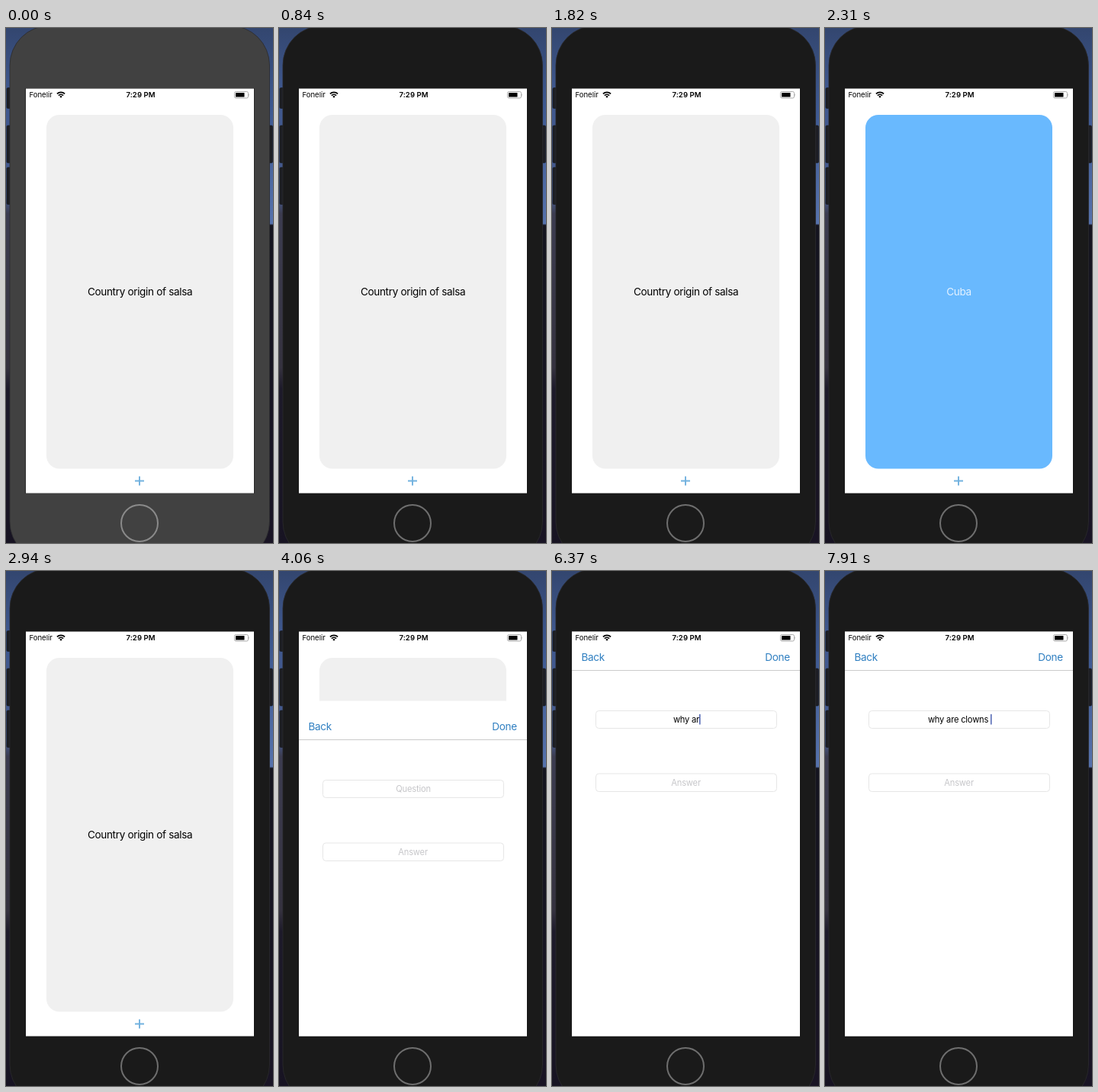
Recreate the animation shown at these times as an HTML page. Size 350 by 676 pixels, loop 8000 ms.

```html
<!DOCTYPE html>
<html lang="en">
<head>
<meta charset="utf-8">
<title>Flash cards</title>
<style>
  html, body { margin: 0; width: 100%; height: 100%; overflow: hidden; background: #15131f; }
  svg { display: block; width: 100%; height: 100%; }
  text { font: 13.55px Inter, "Liberation Sans", sans-serif; letter-spacing: -.33px; }
  .mid { text-anchor: middle; }
  .link { fill: #2f7fc1; }
  .input { font-size: 11.16px; letter-spacing: -.2px; }
  .hint { fill: #c6c6c9; }
  .status { font-size: 9.56px; letter-spacing: 0; }
  .time { font-weight: 600; letter-spacing: .1px; }
  .field { fill: #fff; stroke: #e6e6e6; }
</style>
</head>
<body>
<svg viewBox="0 0 350 676" preserveAspectRatio="none">
  <defs>
    <linearGradient id="skyLeft" x2="0" y2="1">
      <stop offset="0" stop-color="#33466f"/>
      <stop offset=".12" stop-color="#3f588f"/>
      <stop offset=".33" stop-color="#465a8c"/>
      <stop offset=".36" stop-color="#3c3c50"/>
      <stop offset=".66" stop-color="#35323f"/>
      <stop offset=".7" stop-color="#1d1a2a"/>
      <stop offset="1" stop-color="#171322"/>
    </linearGradient>
    <linearGradient id="skyRight" x2="0" y2="1">
      <stop offset="0" stop-color="#33466f"/>
      <stop offset=".15" stop-color="#3d5890"/>
      <stop offset=".38" stop-color="#5672ac"/>
      <stop offset=".383" stop-color="#14141f"/>
      <stop offset="1" stop-color="#191424"/>
    </linearGradient>
    <clipPath id="screen"><rect x="26" y="79.5" width="299" height="531"/></clipPath>
  </defs>

  <rect width="175" height="676" fill="url(#skyLeft)"/>
  <rect x="175" width="175" height="676" fill="url(#skyRight)"/>

  <g fill="#1d1e24" stroke="#14151a" stroke-width=".6">
    <rect x="1" y="78.5" width="6" height="27" rx="1.5"/>
    <rect x="1" y="128" width="6" height="49" rx="1.5"/>
    <rect x="1" y="183" width="6" height="48.5" rx="1.5"/>
    <rect x="343" y="128" width="6.5" height="49" rx="1.5"/>
  </g>
  <rect id="body" x="5" y="-3" width="340.5" height="703" rx="52" stroke="#2b2b2e" stroke-width=".8"/>
  <circle id="home" cx="175" cy="650" r="24" fill="none" stroke-width="2"/>
  <rect x="25.5" y="79" width="300" height="532" fill="#111"/>

  <g clip-path="url(#screen)">
    <rect x="26" y="79" width="299" height="532" fill="#fff"/>
    <rect id="card" x="53" y="114" width="245" height="464.5" rx="17"/>
    <text id="cardText" class="mid" x="175.6" y="351"></text>
    <path id="plus" d="M169 594.5h12M175 588.5v12" stroke="#72b2df" stroke-width="1.9"/>

    <g id="sheet">
      <rect x="26" y="79.5" width="299" height="532" fill="#fff"/>
      <text class="link" x="38.5" y="118">Back</text>
      <text class="link" x="311.8" y="118" text-anchor="end">Done</text>
      <path d="M26 130.5h299" stroke="#cbcbcb"/>
      <rect class="field" x="57.5" y="183.5" width="237" height="23" rx="4"/>
      <rect class="field" x="57.5" y="266" width="237" height="23.5" rx="4"/>
      <text id="question" class="input mid" x="176" y="199"></text>
      <text class="input hint mid" x="175.6" y="281.5">Answer</text>
      <rect id="caret" y="188" width="1.4" height="13.5" fill="#4259ad"/>
    </g>

    <text class="status" x="30.5" y="91.3">Fonelir</text>
    <text class="status time mid" x="176.6" y="91.3">7:29 PM</text>
    <g fill="none" stroke="#000" stroke-width="1.7">
      <path d="M66.9 86.4a7.2 7.2 0 0 1 10.2 0M68.9 88.6a4.4 4.4 0 0 1 6.2 0"/>
      <path d="M70.3 89.9a2.4 2.4 0 0 1 3.4 0L72 91.7z" fill="#000" stroke="none"/>
    </g>
    <rect x="299.5" y="83.5" width="18" height="8.5" rx="2" fill="none" stroke="#a2a2a2" stroke-width=".9"/>
    <rect x="301" y="85" width="11.5" height="5.5" rx=".6"/>
    <path d="M318.5 86.3q1.5 1.4 0 2.9z" fill="#a2a2a2"/>
  </g>
</svg>
<script>
const LOOP = 8000, TICK = 70;
const FLIPS = [910, 1610, 2310, 2940];
const FOCUS = 840, PRESS = 3780, SHEET = 3920, CARET = 5040;
const SENTENCE = "why are clowns ";
// Moment at which each character of the sentence is typed.
const KEYS = [5250, 5390, 5530, 5810, 5950, 6370, 6440, 6580,
              7000, 7070, 7350, 7560, 7630, 7770, 7910];

const el = id => document.getElementById(id);
const [body, home, card, cardText, plus, sheet, question, caret] =
  ["body", "home", "card", "cardText", "plus", "sheet", "question", "caret"].map(el);
const countPast = (times, t) => times.filter(at => at <= t).length;

// Critically damped spring carrying the sheet up from below the screen.
function sheetOffset(t) {
  if (t < SHEET) return 531;
  const x = 18.26 * (t - SHEET + 35) / 1000;
  return Math.round(531 * (1 + x) * Math.exp(-x));
}

function drawPhone(t) {
  const active = t >= FOCUS;
  body.setAttribute("fill", active ? "#1a1a1a" : "#414141");
  home.setAttribute("stroke", active ? "#6e6e6e" : "#8a8a8a");
}

function drawCard(t) {
  const answer = countPast(FLIPS, t) % 2 === 1;
  card.setAttribute("fill", answer ? "#69b9fe" : "#f0f0f0");
  cardText.setAttribute("fill", answer ? "#e4f2ff" : "#000");
  cardText.textContent = answer ? "Cuba" : "Country origin of salsa";
  plus.setAttribute("opacity", t >= PRESS ? .25 : 1);
}

function drawSheet(t) {
  sheet.setAttribute("transform", `translate(0 ${sheetOffset(t)})`);
  const typed = SENTENCE.slice(0, countPast(KEYS, t));
  question.textContent = typed.replace(/ $/, "\u00a0") || "Question";
  question.setAttribute("class", typed ? "input mid" : "input mid hint");
  const half = question.getComputedTextLength() / 2;
  caret.setAttribute("x", typed ? 176 + half : 175 - half);
  caret.setAttribute("visibility", t >= CARET ? "visible" : "hidden");
}

const start = performance.now();
function frame() {
  const elapsed = (performance.now() - start) % LOOP;
  const t = Math.floor(elapsed / TICK) * TICK;
  drawPhone(t);
  drawCard(t);
  drawSheet(t);
  requestAnimationFrame(frame);
}
frame();
</script>
</body>
</html>
```
